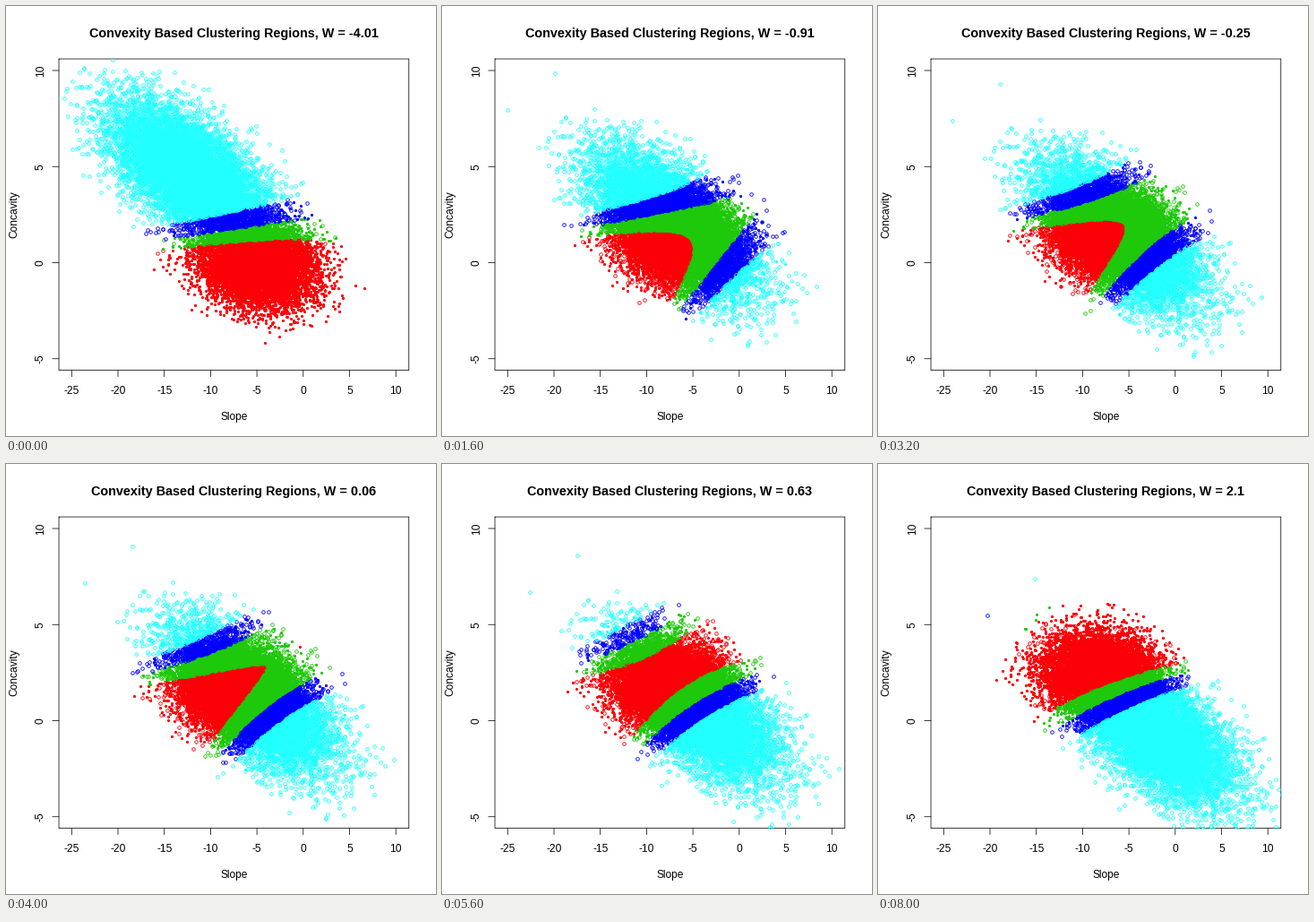
Write a matplotlib script that moves like this. It is 480 px wide and 480 px high and loops after 8800 ms.

```python
import numpy as np
import matplotlib.pyplot as plt
from matplotlib.animation import FuncAnimation

SIZE, DPI = 480, 72
LEFT, RIGHT, TOP, BOTTOM = 59.04, 449.76, 59.04, 406.56
FRAMES = 11
COLORS = ["#fb0007", "#1ec80a", "#0000ff", "#21ffff"]

plt.rcParams["font.family"] = "Liberation Sans"
rng = np.random.default_rng(11)

# W runs through a few key values, evenly between them.
W = np.interp(range(FRAMES), [0, 1, 3, 5, 7, 9, 10],
              [-4.01, -1.26, -0.56, 0.06, 0.63, 1.24, 2.1])

# Each cluster drifts linearly with W (stage pixels per unit of W).
DRIFT_A = np.array([16.4, 17.8])
DRIFT_B = np.array([-5.4, -8.6])


def cloud(center, sx, sy, rho, stray, n=10000, reach=3.6):
    """Correlated normal cloud cut at `reach` deviations, plus far strays."""
    z = rng.standard_normal((n, 2))
    z = z[np.hypot(*z.T) < reach]
    x = sx * z[:, 0]
    y = sy * (rho * z[:, 0] + np.sqrt(1 - rho**2) * z[:, 1])
    return np.vstack([np.column_stack([x, y]), stray]) + center


group_a = cloud((271.5, 260), 43, 38.5, 0.6,
                [(-184, -128), (-131, -169), (161, 69)])
group_b = cloud((260.3, 254.5), 31, 23, 0.15,
                [(118, 26), (7, 87), (-117, 5)])


def region(pts, w):
    """Index 0..3 of the hyperbolic band that holds each point."""
    t = pts[:, 0] - 265
    axis = 248 - 38.2 * w - 0.72 * t
    core = (400 + 280 * w + 945 * abs(w)**2.2
            + (38 * w - 25) * t + 0.26 * t**2)
    step = 2250 + 150 * w**2
    level = ((pts[:, 1] - axis)**2 - core) / step
    return np.searchsorted([0, 1, 2.4], level)


fig = plt.figure(figsize=(SIZE / DPI, SIZE / DPI), dpi=DPI, facecolor="white")
ax = fig.add_axes([LEFT / SIZE, 1 - BOTTOM / SIZE,
                   (RIGHT - LEFT) / SIZE, (BOTTOM - TOP) / SIZE])
ax.set(xlim=(LEFT, RIGHT), ylim=(BOTTOM, TOP))
ax.axis("off")


def line(xs, ys):
    ax.plot(xs, ys, color="black", lw=0.75, clip_on=False, snap=False,
            zorder=1, solid_capstyle="round")


def label(x, y, s, size=12, **kw):
    return ax.text(x, y, s, fontsize=size, ha="center", va="baseline",
                   rotation_mode="anchor", **kw)


line([LEFT, RIGHT, RIGHT, LEFT, LEFT], [TOP, TOP, BOTTOM, BOTTOM, TOP])
for v in range(-25, 11, 5):
    x = 331.8 + 10.34 * v
    line([x, x], [BOTTOM, BOTTOM + 7.2])
    label(x, 433, str(v))
for v in range(-5, 11, 5):
    y = 286.5 - 21.45 * v
    line([LEFT - 7.2, LEFT], [y, y])
    label(42, y, str(v), rotation=90)
label(254.4, 462, "Slope")
label(12.5, 233, "Concavity", rotation=90)
title = label(254.4, 35, "", size=14.4, weight="bold")

rings, dots = [], []
for c in COLORS:
    rings += ax.plot([], [], "o", ms=3.6, mfc="none", mec=c, mew=0.85)
    dots += ax.plot([], [], "o", ms=3.2, mfc=c, mew=0)


def place(marks, pts, w):
    band = region(pts, w)
    for k, mark in enumerate(marks):
        mark.set_data(*pts[band == k].T)


def update(i):
    w = W[i]
    place(rings, group_a + w * DRIFT_A, w)
    place(dots, group_b + w * DRIFT_B, w)
    title.set_text(f"Convexity Based Clustering Regions, W = {round(w, 2):g}")
    return [title, *rings, *dots]


anim = FuncAnimation(fig, update, frames=FRAMES, interval=800,
                     repeat=True, repeat_delay=0)
plt.show()
```
